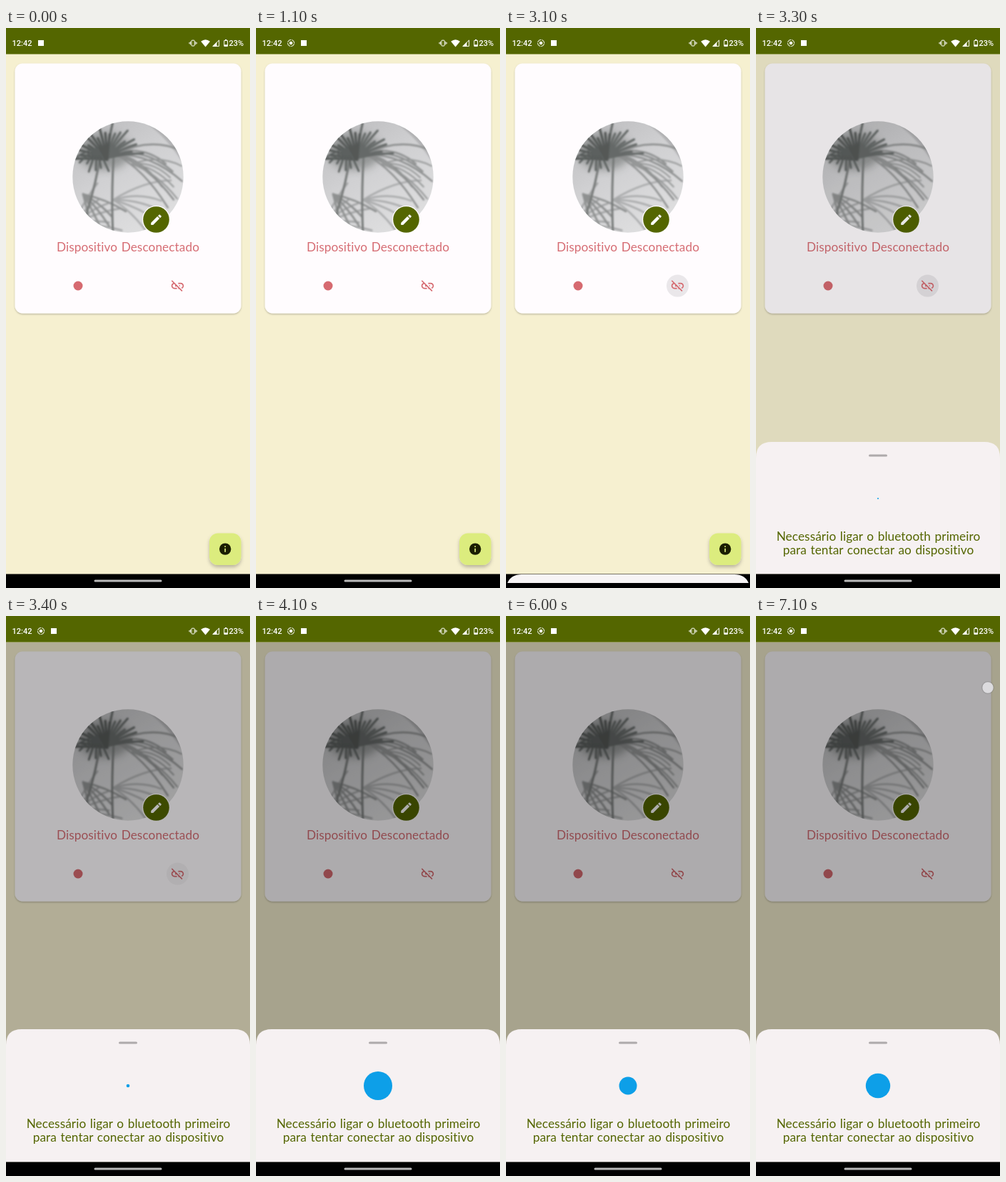
These frames come from a looping animation (342x782 px, 7200 ms). An HTML page:

```html
<!DOCTYPE html>
<html lang="pt">
<head>
<meta charset="utf-8">
<style>
html, body { margin: 0; width: 100%; height: 100%; overflow: hidden; background: #f6f0d0; }
svg { display: block; width: 342px; height: 782px; }
.label { font: 400 17.2px Lato, sans-serif; letter-spacing: .1px; word-spacing: 1px; text-anchor: middle; }
.status { font: 500 11px Roboto, sans-serif; fill: #fff; }
</style>
</head>
<body>
<svg viewBox="0 0 342 782">
  <defs>
    <clipPath id="round"><circle cx="171" cy="208" r="77.7"/></clipPath>
    <clipPath id="body"><rect y="36.5" width="342" height="726"/></clipPath>
    <linearGradient id="wall" x1="0" y1="0" x2=".6" y2="1">
      <stop offset="0" stop-color="#b9b9bb"/><stop offset=".5" stop-color="#d0d0d2"/><stop offset="1" stop-color="#dededf"/>
    </linearGradient>
    <filter id="soft"><feGaussianBlur stdDeviation="1"/></filter>
    <filter id="haze" x="-40%" y="-40%" width="180%" height="180%"><feGaussianBlur stdDeviation="6"/></filter>
    <filter id="lift" x="-30%" y="-30%" width="160%" height="160%">
      <feDropShadow dx="0" dy="1.3" stdDeviation="1.3" flood-opacity=".25"/>
    </filter>
    <filter id="float" x="-30%" y="-30%" width="160%" height="160%">
      <feDropShadow dx="0" dy="3" stdDeviation="2.5" flood-opacity=".25"/>
    </filter>
  </defs>

  <rect width="342" height="782" fill="#f6f0d0"/>
  <rect x="12.5" y="49.5" width="317" height="349" rx="11" fill="#fffcfe" filter="url(#lift)"/>

  <g clip-path="url(#round)">
    <rect x="93" y="130" width="156" height="156" fill="url(#wall)"/>
    <path d="M190 128Q225 150 252 195V128Z" fill="#a5a5a7" opacity=".7" filter="url(#soft)"/>
    <ellipse cx="138" cy="172" rx="38" ry="26" fill="#6f7372" opacity=".6" filter="url(#haze)"/>
    <g id="palm" fill="none" stroke-linecap="round" filter="url(#soft)"/>
  </g>
  <circle cx="210.5" cy="267.5" r="19.6" fill="#fffcfe"/>
  <circle cx="210.5" cy="267.5" r="18.3" fill="#546600"/>
  <path transform="translate(200.8 258) scale(.81)" fill="#fff" d="M3 17.25V21h3.75L17.81 9.94l-3.75-3.75zM20.71 7.04c.39-.39.39-1.02 0-1.41l-2.34-2.34c-.39-.39-1.02-.39-1.41 0l-1.83 1.83 3.75 3.75z"/>

  <text class="label" x="171" y="312" fill="#d66d74">Dispositivo Desconectado</text>
  <circle cx="101" cy="360" r="6.5" fill="#d66a70"/>
  <circle id="ripple" cx="240.5" cy="360" fill="#40404c"/>
  <path transform="translate(230 349.6) scale(.875)" fill="#d66a70" d="M17 7h-4v1.9h4c1.71 0 3.1 1.39 3.1 3.1 0 1.43-.98 2.63-2.31 2.98l1.46 1.46C20.88 15.61 22 13.95 22 12c0-2.76-2.24-5-5-5zm-1 4h-2.19l2 2H16zM2 4.27l3.11 3.11C3.29 8.12 2 9.91 2 12c0 2.76 2.24 5 5 5h4v-1.9H7c-1.71 0-3.1-1.39-3.1-3.1 0-1.59 1.21-2.9 2.76-3.07L8.73 11H8v2h2.73L13 15.27V17h1.73l4.01 4L20 19.74 3.27 3z"/>

  <rect x="285" y="705.5" width="44.5" height="44.5" rx="12" fill="#dcec7e" filter="url(#float)"/>
  <circle cx="307.2" cy="727.6" r="8.2" fill="#1a1e00"/>
  <path d="M307.2 726.8v5M307.2 723.2v1.7" stroke="#dcec7e" stroke-width="1.7"/>

  <rect id="scrim" y="36.5" width="342" height="726.5"/>

  <g clip-path="url(#body)">
    <g id="sheet">
      <path d="M0 790V599Q0 577 22 577H320Q342 577 342 599V790Z" fill="#f6f1f2"/>
      <rect x="158" y="594.5" width="26" height="3" rx="1.5" fill="#aeaaab"/>
      <circle id="pulse" cx="171" cy="656" fill="#0d9fe8"/>
      <g class="label" fill="#546600">
        <text x="171.5" y="714.5">Necessário ligar o bluetooth primeiro</text>
        <text x="171.5" y="733.5">para tentar conectar ao dispositivo</text>
      </g>
    </g>
  </g>

  <rect y="762.5" width="342" height="20"/>
  <rect x="123.5" y="770.4" width="95" height="3" rx="1.5" fill="#b9b9b9"/>
  <path id="peek" d="M2 775Q7 763 22 763H320Q335 763 340 775Z" fill="#f7f4f5"/>

  <rect width="342" height="36.5" fill="#546600"/>
  <text class="status" x="8.5" y="25.3">12:42</text>
  <g id="record" fill="none" stroke="#fff" stroke-width="1">
    <circle r="4.6" stroke-dasharray="6.2 1.03" stroke-dashoffset="-.6"/><circle r="2.3" fill="#fff" stroke="none"/>
  </g>
  <rect id="note" y="17" width="8" height="8" fill="#fff"/>
  <g fill="none" stroke="#fff" stroke-width="1">
    <rect x="260" y="17.2" width="4.2" height="7.8" rx=".8"/>
    <path d="M258.4 18.9v4.4M265.8 18.9v4.4M257 20v2.2M267.2 20v2.2"/>
    <path d="M290.2 25.4L298.6 17V25.4Z"/>
    <path d="M305.8 17.6h4.8v7.8h-4.8zM307 16.5h2.4"/>
  </g>
  <g fill="#fff">
    <path d="M273.2 18.8Q279.6 13.6 286 18.8L279.6 26.4Z"/>
    <path d="M289 26L295.5 19.5V26ZM306 23.2h4.4V25.6H306Z"/>
  </g>
  <text class="status" x="312.4" y="25.3">23%</text>

  <g id="touch">
    <circle r="9" fill="#777" opacity=".35"/><circle r="7.7" fill="#dcdbde"/>
  </g>
</svg>
<script>
const LOOP = 7200, STEP = 100, CYCLE = 2300;
const $ = id => document.getElementById(id);
const set = (id, attrs) => { for (const k in attrs) $(id).setAttribute(k, attrs[k]); };

// Piecewise linear track: [time, value] pairs
function track(t, keys) {
  if (t <= keys[0][0]) return keys[0][1];
  for (let i = 1; i < keys.length; i++) {
    const [a, u] = keys[i - 1], [b, v] = keys[i];
    if (t <= b) return u + (v - u) * (t - a) / (b - a);
  }
  return keys[keys.length - 1][1];
}

function stroke(d, color, width) {
  const p = document.createElementNS('http://www.w3.org/2000/svg', 'path');
  p.setAttribute('d', d);
  p.setAttribute('stroke', color);
  p.setAttribute('stroke-width', width);
  $('palm').append(p);
}

// Blades spreading from one point between two angles (degrees), drooping at the tips
function fan(x, y, from, to, count, len, droop, color, width) {
  let d = '';
  for (let i = 0; i < count; i++) {
    const a = (from + (to - from) * i / (count - 1)) * Math.PI / 180;
    const l = len * (.85 + .15 * Math.cos(i * 2.3));
    const dx = l * Math.cos(a), dy = l * Math.sin(a);
    d += `M${x} ${y}q${dx * .55} ${dy * .55 - droop * .2} ${dx} ${dy + droop}`;
  }
  stroke(d, color, width);
}

fan(93, 275, -62, 12, 7, 75, 8, '#a3a4a5', 2.6);
fan(150, 240, -28, 35, 5, 92, 16, '#a9aaab', 2.4);
fan(108, 232, 15, 75, 5, 62, 8, '#8f9191', 2.8);
fan(152, 176, -20, 32, 7, 98, 28, '#8c8e8e', 2.4);
fan(176, 190, -14, 24, 4, 72, 20, '#969898', 2);
stroke('M152 165Q147 225 150 290M132 178Q127 215 112 262', '#777a79', 3);
fan(140, 182, -80, -12, 9, 54, 4, '#656968', 3);
fan(142, 184, -175, -85, 11, 50, 3, '#545857', 3.2);
fan(128, 168, 60, 165, 7, 32, 4, '#5c605f', 2.6);

function draw(t) {
  const p = track(t, [[0, 0], [500, 1]]), slide = 1 - (1 - p) ** 2;
  set('record', { transform: `translate(49 21) scale(${slide})`, opacity: slide });
  set('note', { x: 45 + 18 * slide });

  set('ripple', {
    r: track(t, [[2600, 0], [2900, 15.5]]),
    opacity: track(t, [[2600, 0], [2800, .11], [3300, .11], [3400, .05], [3500, 0]])
  });
  const end = t >= 7100, tap = t >= 2600 && t < 2800;
  set('touch', { transform: end ? 'translate(325 100)' : 'translate(240.5 360)', opacity: end || tap ? 1 : 0 });

  set('peek', { opacity: t >= 3100 && t < 3300 ? 1 : 0 });
  set('scrim', { opacity: track(t, [[3200, 0], [3300, .095], [3400, .28], [3500, .32]]) });
  set('sheet', { transform: `translate(0 ${t < 3300 ? 210 : t < 3400 ? 1 : 0})` });

  const c = Math.max(0, t - 3300) % CYCLE;
  set('pulse', { r: track(c, [[0, 1], [100, 2.3], [300, 9], [500, 16], [800, 20], [1100, 21.5],
    [1400, 21], [1500, 17.2], [1700, 16.5], [1900, 9], [2100, 0], [2200, 0]]) });
}

function tick() {
  draw(Math.floor(performance.now() % LOOP / STEP) * STEP);
  requestAnimationFrame(tick);
}
tick();
</script>
</body>
</html>
```
